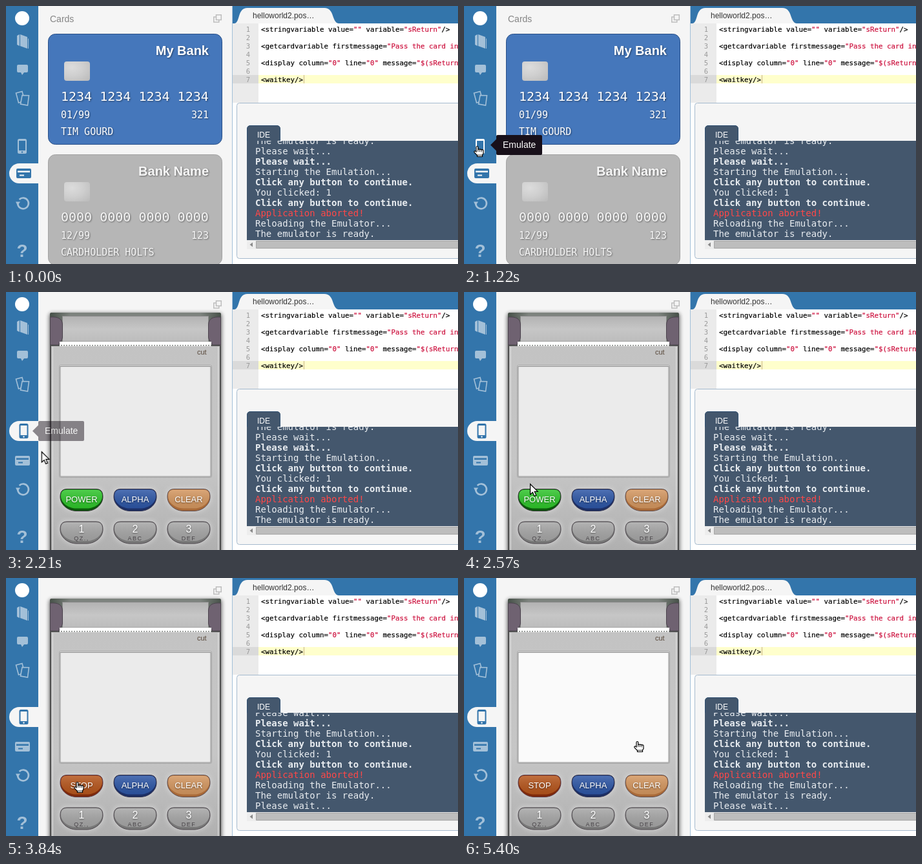
An HTML page that plays this animation: 700x400 px, repeating every 8000 ms.

```html
<!DOCTYPE html>
<html lang="en">
<head>
<meta charset="utf-8">
<title>Terminal emulator</title>
<style>
html, body { margin: 0; width: 100%; height: 100%; overflow: hidden; background: #fff; }
svg { display: block; width: 700px; height: 400px; }
text { font-family: "Liberation Sans", Arial, sans-serif; }
.mono text, text.mono { font-family: "DejaVu Sans Mono", monospace; }
.mid { text-anchor: middle; }
.end { text-anchor: end; }
.code text { font-size: 10.8px; stroke: #000; stroke-width: .2px; }
.code tspan { fill: #cc0f3c; stroke: #cc0f3c; }
.nums text { font-size: 10.5px; fill: #999; text-anchor: end; }
.log text { font-size: 14px; fill: #e9edf1; }
.log .b { font-weight: bold; }
.card text { filter: drop-shadow(1.5px 1.5px .8px rgba(0,0,0,.45)); }
.title { font-size: 20px; font-weight: bold; text-anchor: end; }
.card .num { font-size: 20px; }
.card .sm { font-size: 15px; }
.label { font-size: 13px; fill: #fff; text-anchor: middle; filter: drop-shadow(0 1px 1px rgba(0,0,0,.5)); }
.key { font-size: 16px; fill: #fff; text-anchor: middle; filter: drop-shadow(0 1px 1px rgba(0,0,0,.45)); }
.sub { font-size: 9px; fill: #484448; text-anchor: middle; letter-spacing: 1.5px; }

.cards, .emu, .hover, .hand, .arrow, .power, .press, .stop, .cursor, .lines {
  animation: 8s step-end infinite;
}
.cards { animation-name: cards; }
.emu { animation-name: emu; }
.hover { animation-name: hover; }
.hand { animation-name: hand; }
.arrow { animation-name: arrow; }
.power { animation-name: power; }
.press { animation-name: press; }
.stop { animation-name: stop; }
.cursor { animation-name: move; }
.lines { animation-name: scroll; }
.tip { animation: tip 8s linear infinite; }
.lcd { animation: lcd 8s linear infinite; }

@keyframes cards { 0% { visibility: visible } 19.36%, 100% { visibility: hidden } }
@keyframes emu { 0% { visibility: hidden } 19.36%, 100% { visibility: visible } }
@keyframes hover { 0% { opacity: 0 } 8.1%, 100% { opacity: 1 } }
@keyframes hand {
  0% { opacity: 0 } 8.1% { opacity: 1 } 27.1% { opacity: 0 } 34.1%, 100% { opacity: 1 }
}
@keyframes arrow {
  0% { opacity: 0 } 6.11% { opacity: 1 } 8.1% { opacity: 0 } 27.1% { opacity: 1 } 34.1%, 100% { opacity: 0 }
}
@keyframes power { 0% { opacity: 1 } 41.61%, 100% { opacity: 0 } }
@keyframes press { 0% { opacity: 0 } 41.61% { opacity: 1 } 47.98%, 100% { opacity: 0 } }
@keyframes stop { 0% { opacity: 0 } 47.98%, 100% { opacity: 1 } }
@keyframes scroll { 0% { transform: translateY(0) } 47.98%, 100% { transform: translateY(-16px) } }
@keyframes tip {
  0%, 8.6% { opacity: 0 } 10.6%, 26.6% { opacity: 1 } 28.6%, 100% { opacity: 0 }
}
@keyframes lcd { 0%, 54.36% { fill: #ebebeb } 58.1%, 100% { fill: #fafafa } }
@keyframes move {
  0% { transform: translate(80px, 221px) }
  6.11% { transform: translate(80px, 221px); animation-timing-function: steps(5, start) }
  8.6% { transform: translate(45px, 222px); animation-timing-function: steps(7, start) }
  12.1% { transform: translate(28px, 222px) }
  15.24% { transform: translate(20px, 217px) }
  26.11% { transform: translate(20px, 217px); animation-timing-function: steps(6, start) }
  29.11% { transform: translate(72px, 262px); animation-timing-function: steps(7, start) }
  32.61% { transform: translate(102px, 297px); animation-timing-function: steps(8, start) }
  36.61% { transform: translate(110px, 316px) }
  54.36% { transform: translate(110px, 316px); animation-timing-function: steps(9, start) }
  58.86% { transform: translate(169px, 290px); animation-timing-function: steps(11, start) }
  63.99% { transform: translate(230px, 269px) }
  64.49% { transform: translate(230px, 269px); animation-timing-function: steps(7, start) }
  67.98%, 100% { transform: translate(268px, 253px) }
}
</style>
</head>
<body>
<svg viewBox="0 0 700 400">
  <defs>
    <linearGradient id="top">
      <stop offset="0" stop-color="#465048"/><stop offset=".12" stop-color="#7d837e"/>
      <stop offset=".88" stop-color="#7d837e"/><stop offset="1" stop-color="#465048"/>
    </linearGradient>
    <linearGradient id="slot" x2="0" y2="1">
      <stop offset="0" stop-color="#b2b2b2"/><stop offset=".5" stop-color="#c6c6c6"/><stop offset="1" stop-color="#bcbcbc"/>
    </linearGradient>
    <linearGradient id="case" x2="0" y2="1">
      <stop offset="0" stop-color="#c3c3c3"/><stop offset=".6" stop-color="#c6c6c6"/><stop offset="1" stop-color="#b0b0b0"/>
    </linearGradient>
    <linearGradient id="gloss" x2="0" y2="1">
      <stop offset="0" stop-color="#fff" stop-opacity=".16"/><stop offset="1" stop-color="#000" stop-opacity=".08"/>
    </linearGradient>
    <radialGradient id="chip" cx=".3" cy=".3" r=".9">
      <stop offset="0" stop-color="#dcdcdc"/><stop offset=".5" stop-color="#cfcfcf"/><stop offset="1" stop-color="#bdbdbd"/>
    </radialGradient>
    <filter id="blur" x="-20%" y="-20%" width="140%" height="140%"><feGaussianBlur stdDeviation="3"/></filter>
    <clipPath id="logbox"><path d="M373 209H700V363H373Z"/></clipPath>
    <clipPath id="panel"><path d="M50 0H350V400H50Z"/></clipPath>
    <path id="rim" d="M-33 12C-33 4-30 0-22 0H22C30 0 33 4 33 12C33 25 20 34 8 34H-8C-20 34-33 25-33 12Z"/>
    <path id="face" d="M-32 11C-32 4-29 1-22 1H22C29 1 32 4 32 11C32 22 20 30 8 30H-8C-20 30-32 22-32 11Z"/>
    <g id="halo"><use href="#rim" fill="none" stroke="#dedede" stroke-width="5" opacity=".65" filter="url(#blur)"/></g>
    <g id="phone">
      <rect width="14" height="23" rx="2.5"/>
    </g>
    <g id="cc"><rect width="23" height="15" rx="2"/></g>
  </defs>

  <!-- left panel -->
  <path fill="#f5f5f5" d="M50 0H350V400H50Z"/>
  <g fill="none" stroke="#bdbdbd" stroke-width="1.5">
    <path d="M325.5 13.8H333.3V21.5H325.5Z"/><path d="M325 17H321.8V25H329.8V22"/>
  </g>

  <g class="cards">
    <text x="68" y="25" font-size="14" fill="#858585">Cards</text>
    <g class="card" fill="#fff">
      <rect x="65.5" y="43.5" width="269" height="171" rx="11" fill="#4577bb" stroke="#294f87"/>
      <rect x="90" y="86" width="40" height="30" rx="4" fill="url(#chip)"/>
      <text class="title" x="314" y="76">My Bank</text>
      <text class="mono num" x="85" y="147">1234 1234 1234 1234</text>
      <text class="mono sm" x="85" y="174">01/99</text>
      <text class="mono sm end" x="314" y="174">321</text>
      <text class="mono sm" x="85" y="200">TIM GOURD</text>
    </g>
    <g class="card" fill="#f6f6f6" transform="translate(0 187)">
      <rect x="65.5" y="43.5" width="269" height="171" rx="11" fill="#b6b6b6" stroke="#a2a2a2"/>
      <rect x="90" y="86" width="40" height="30" rx="4" fill="url(#chip)"/>
      <text class="title" x="314" y="76">Bank Name</text>
      <text class="mono num" x="85" y="147">0000 0000 0000 0000</text>
      <text class="mono sm" x="85" y="174">12/99</text>
      <text class="mono sm end" x="314" y="174">123</text>
      <text class="mono sm" x="85" y="200">CARDHOLDER HOLTS</text>
    </g>
  </g>

  <!-- payment terminal -->
  <g class="emu" clip-path="url(#panel)">
    <rect x="67" y="33" width="267" height="390" rx="4" fill="#000" opacity=".6" filter="url(#blur)"/>
    <rect x="68" y="32" width="265" height="390" rx="3" fill="#4d4d4d"/>
    <path fill="url(#case)" d="M70 83H331V400H70Z"/>
    <path fill="none" stroke="#dcdcdc" d="M72.5 85V400M328.5 85V400"/>
    <rect x="68" y="32" width="265" height="51" rx="3" fill="url(#top)"/>
    <path fill="url(#slot)" stroke="#8c8c8c" d="M87.5 37.5H313.5V77H87.5Z"/>
    <g fill="#6f6271" stroke="#4b434d">
      <path d="M68.5 39C80 38 87 41 87.5 50V70C87 76 82 78 82 82H68.5Z"/>
      <path d="M332.5 39C321 38 314 41 313.5 50V70C314 76 319 78 319 82H332.5Z"/>
    </g>
    <path fill="#fff" d="M83 77H318V82H83Z"/>
    <path stroke="#fff" stroke-width="2" stroke-dasharray="2 2" d="M83 83H318"/>
    <path stroke="#555" d="M69 83.5H83M318 83.5H332"/>
    <text x="296" y="97" font-size="11" fill="#59493c">cut</text>
    <rect x="82.5" y="113.5" width="236" height="174" rx="2" fill="#dedede" stroke="#a6a6a6"/>
    <rect class="lcd" x="84" y="115.5" width="233" height="170.5" stroke="#8b8b8b"/>

    <g transform="translate(117 305.5)">
      <use href="#halo"/>
      <g class="power">
        <use href="#rim" fill="#0b5a0b" stroke="#333"/><use href="#face" fill="#2fc42b"/><use href="#face" fill="url(#gloss)"/>
        <text class="label" y="20.5">POWER</text>
      </g>
      <g class="press">
        <use href="#rim" fill="#0b5a0b" stroke="#333"/><use href="#face" y="2" fill="#25a022"/>
        <text class="label" y="21.5">POWER</text>
      </g>
      <g class="stop">
        <use href="#rim" fill="#7f2a0a" stroke="#5a3a4a"/><use href="#face" fill="#b5551c"/><use href="#face" fill="url(#gloss)"/>
        <text class="label" y="20.5">STOP</text>
      </g>
    </g>
    <g transform="translate(200 305.5)">
      <use href="#halo"/>
      <use href="#rim" fill="#1c2f66" stroke="#34344e"/><use href="#face" fill="#2d56a5"/><use href="#face" fill="url(#gloss)"/>
      <text class="label" y="20.5">ALPHA</text>
    </g>
    <g transform="translate(283 305.5)">
      <use href="#halo"/>
      <use href="#rim" fill="#a96a38" stroke="#5c4a4c"/><use href="#face" fill="#d3965f"/><use href="#face" fill="url(#gloss)"/>
      <text class="label" y="20.5">CLEAR</text>
    </g>
    <g transform="translate(117 356)">
      <use href="#halo"/><use href="#rim" fill="#777" stroke="#4c464c"/><use href="#face" fill="#a6a6a6"/><use href="#face" fill="url(#gloss)"/>
      <text class="key" y="17">1</text><text class="sub" y="29">QZ.,</text>
    </g>
    <g transform="translate(200 356)">
      <use href="#halo"/><use href="#rim" fill="#777" stroke="#4c464c"/><use href="#face" fill="#a6a6a6"/><use href="#face" fill="url(#gloss)"/>
      <text class="key" y="17">2</text><text class="sub" y="29">ABC</text>
    </g>
    <g transform="translate(283 356)">
      <use href="#halo"/><use href="#rim" fill="#777" stroke="#4c464c"/><use href="#face" fill="#a6a6a6"/><use href="#face" fill="url(#gloss)"/>
      <text class="key" y="17">3</text><text class="sub" y="29">DEF</text>
    </g>
  </g>

  <!-- sidebar -->
  <path fill="#3375ab" d="M0 0H50V400H0Z"/>
  <circle cx="25" cy="19" r="11" fill="#fff"/>
  <g fill="#a3c0d8">
    <path d="M17 46L21 44V62L17 60ZM22 44L33 48V66L22 62Z"/>
    <path d="M34 50L35 51V66L34 66Z"/>
    <path d="M19 91H32Q34 91 34 93V101Q34 103 32 103H28L25 107L23 103H19Q17 103 17 101V93Q17 91 19 91Z"/>
    <g fill="none" stroke="#a3c0d8" stroke-width="1.6">
      <path d="M15.5 135L25 132.5L29 147.5L19.5 150Z"/>
      <path fill="#3375ab" d="M25 138.5L35.5 138.8L33.5 154L22.5 152Z"/>
    </g>
    <path fill="none" stroke="#a3c0d8" stroke-width="2.6" d="M18.2 307A8.4 8.4 0 1 0 20.6 300"/>
    <path d="M15 303.5H22L18 309.5Z"/>
    <text class="mid" x="25" y="389" font-size="28" font-weight="bold">?</text>
  </g>
  <g class="cards">
    <path fill="#f5f5f5" d="M50 244H20.5A15.5 15.5 0 0 0 20.5 275H50Z"/>
    <use href="#cc" x="16" y="252" fill="#3375ab"/>
    <path fill="#f5f5f5" d="M18 255.5H37V258H18ZM21 261.5H28V263.5H21Z"/>
    <use href="#phone" x="18" y="206" fill="#a3c0d8"/>
    <use class="hover" href="#phone" x="18" y="206" fill="#fff"/>
    <path fill="#3375ab" d="M20 209H30V224H20Z"/><circle cx="25" cy="226.5" r="1.2" fill="#3375ab"/>
  </g>
  <g class="emu">
    <path fill="#f5f5f5" d="M50 200H20.5A15.5 15.5 0 0 0 20.5 231H50Z"/>
    <use href="#phone" x="20.5" y="204" fill="#3375ab"/>
    <path fill="#f5f5f5" d="M22.5 207H32.5V222H22.5Z"/><circle cx="27.5" cy="224.5" r="1.2" fill="#f5f5f5"/>
    <use href="#cc" x="14" y="254" fill="#a3c0d8"/>
    <path fill="#3375ab" d="M16 257.5H35V260H16ZM19 263.5H26V265.5H19Z"/>
  </g>

  <!-- editor -->
  <path fill="#fff" d="M351 27H700V400H351Z"/>
  <path fill="#3375ab" d="M351 0H700V27H351Z"/>
  <path fill="#f5f5f5" d="M354 27C363 25 358 3 374 3H493C509 3 504 25 515 27Z"/>
  <text x="382" y="19" font-size="12" fill="#333">helloworld2.pos…</text>
  <path fill="#ebebeb" d="M351 27H391V150H351Z"/>
  <path fill="#dadada" d="M351 107H391V120H351Z"/>
  <path fill="#ffffcc" d="M391 107H700V120H391Z"/>
  <path stroke="#a3c0d8" d="M350.5 0V400"/>
  <g class="mono nums">
    <text x="378" y="40">1</text><text x="378" y="53">2</text><text x="378" y="66">3</text>
    <text x="378" y="79">4</text><text x="378" y="92">5</text><text x="378" y="105">6</text>
    <text x="378" y="118">7</text>
  </g>
  <g class="mono code">
    <text x="395" y="40">&lt;stringvariable value=<tspan>""</tspan> variable=<tspan>"sReturn"</tspan>/&gt;</text>
    <text x="395" y="66">&lt;getcardvariable firstmessage=<tspan>"Pass the card in</tspan></text>
    <text x="395" y="92">&lt;display column=<tspan>"0"</tspan> line=<tspan>"0"</tspan> message=<tspan>"$(sReturn</tspan></text>
    <text x="395" y="118">&lt;waitkey/&gt;</text>
  </g>
  <path stroke="#c9b487" d="M461.5 107V120"/>

  <!-- console -->
  <rect x="357.5" y="150.5" width="360" height="241" rx="4" fill="#f5f5f5" stroke="#a5bace"/>
  <path fill="#44576d" d="M373 209V191Q373 185 379 185H419Q425 185 425 191V209Z"/>
  <path fill="none" stroke="#2f4f70" d="M373.5 209V191Q373.5 185.5 379 185.5H419Q424.5 185.5 424.5 191V209"/>
  <text x="389" y="204" font-size="12" fill="#fff">IDE</text>
  <path fill="#44576d" d="M373 209H700V363H373Z"/>
  <g clip-path="url(#logbox)">
    <g class="mono log lines">
      <text x="386" y="214">The emulator is ready.</text>
      <text x="386" y="230">Please wait...</text>
      <text class="b" x="386" y="246">Please wait...</text>
      <text x="386" y="262">Starting the Emulation...</text>
      <text class="b" x="386" y="278">Click any button to continue.</text>
      <text x="386" y="294">You clicked: 1</text>
      <text class="b" x="386" y="310">Click any button to continue.</text>
      <text x="386" y="326" style="fill:#ff4848">Application aborted!</text>
      <text x="386" y="342">Reloading the Emulator...</text>
      <text x="386" y="358">The emulator is ready.</text>
      <text x="386" y="374">Please wait...</text>
    </g>
  </g>
  <path fill="#ededed" d="M373 363H700V377H373Z"/>
  <path fill="#bdbdbd" stroke="#a5a5a5" d="M387.5 364.5H702V375.5H387.5Z"/>
  <path fill="#8a8a8a" d="M382 366.5V373.5L377.5 370Z"/>

  <!-- tooltip and pointer -->
  <g class="tip">
    <path fill="#18101a" d="M41 215.5L50 206.5V202Q50 200 52 200H119Q121 200 121 202V229Q121 231 119 231H52Q50 231 50 229V224.5Z"/>
    <text x="60" y="220" font-size="14" fill="#fff">Emulate</text>
  </g>
  <g class="cursor">
    <path class="arrow" fill="#fff" stroke="#000" stroke-width="1.2" d="M.6 .8V17L4.4 13.5L7 19.4L9.8 18.2L7.2 12.4H12.3Z"/>
    <g class="hand" transform="translate(-5 0)" fill="#fff" stroke="#000" stroke-width="1.2">
      <path d="M4 9V1.9A1.4 1.4 0 0 1 6.8 1.9V6.2A1.3 1.3 0 0 1 9.5 6.3A1.3 1.3 0 0 1 12.2 6.8A1.3 1.3 0 0 1 15 7.6V11.5L13.5 14V16.5H5.5V14.5L1 9.8A1.3 1.3 0 0 1 2.6 7.9Z"/>
      <path fill="none" stroke-width=".9" d="M6.8 6V9M9.5 6.5V9M12.2 7V9.3M5.5 14.2H13.5"/>
    </g>
  </g>
</svg>
</body>
</html>
```
